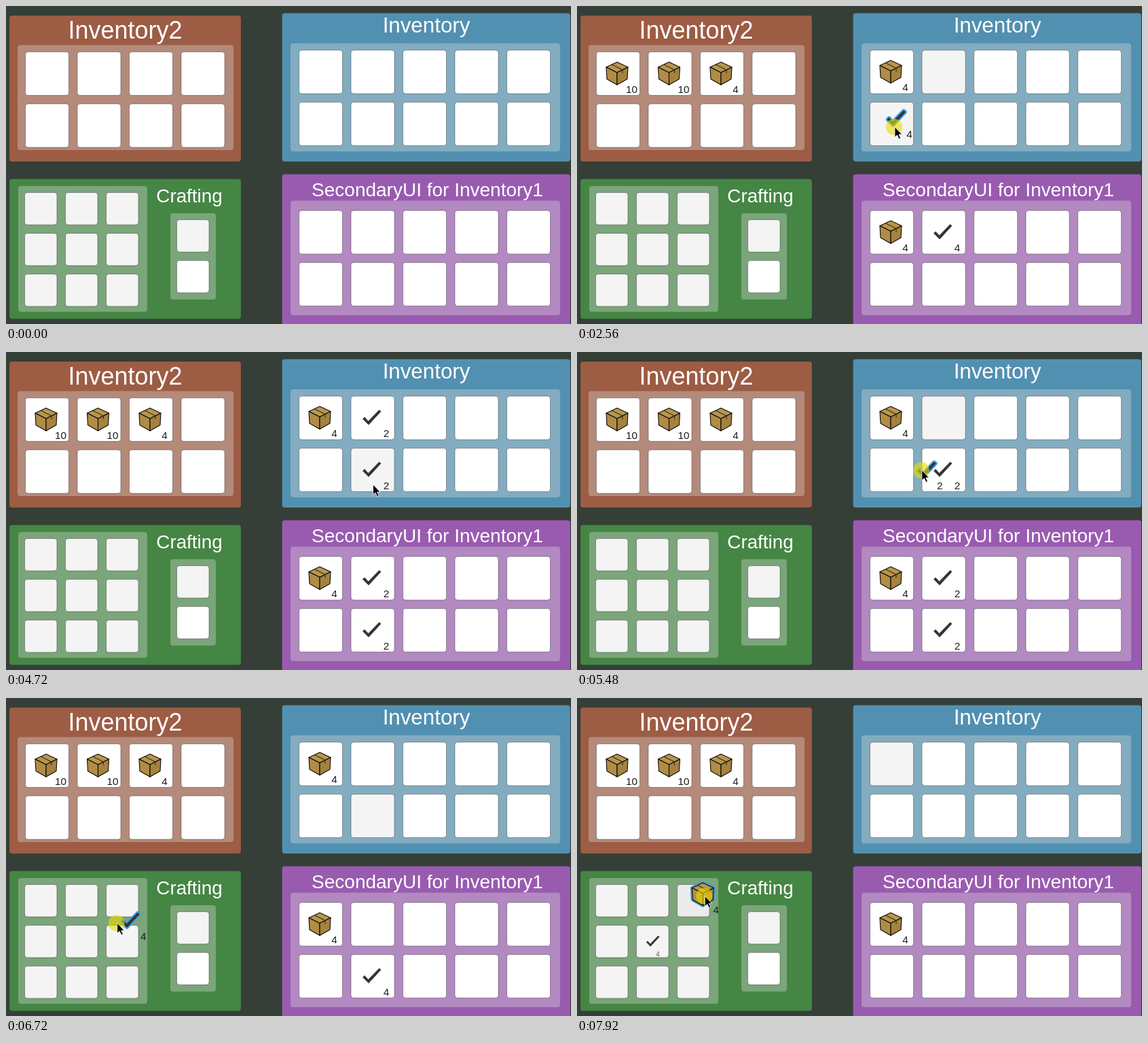
These frames come from a looping animation (832 px wide and 468 px high, 8 s). An HTML page:

```html
<!DOCTYPE html>
<html lang="en">
<head>
<meta charset="utf-8">
<title>Inventory drag and drop</title>
<style>
  html, body { margin: 0; width: 100%; height: 100%; overflow: hidden; background: #353f37; }
  svg { display: block; width: 832px; height: 468px; }
  text { font-family: "Liberation Sans", Arial, sans-serif; text-anchor: middle; }
  .title { fill: #fff; }
  .count { fill: #1c1c1c; font-size: 15.3px; }
  .panel { stroke: rgba(0, 0, 0, .08); }
  .tray { fill: rgba(222, 222, 222, .35); }
  .slot { stroke: rgba(40, 40, 40, .42); }
</style>
</head>
<body>
<svg viewBox="0 0 832 468">
  <defs>
    <g id="box" stroke="#0d0a05" stroke-width="1.1" stroke-linejoin="round">
      <path d="M0-16.5 16-9 0-1-16-9Z" fill="#b8964f"/>
      <path d="M-16-9 0-1V17L-15 8.5Z" fill="#b08c46"/>
      <path d="M16-9 0-1V17L15 8.5Z" fill="#a5823f"/>
      <path d="M-8-13 8-5V0" fill="none" stroke="#3b2d12"/>
    </g>
    <path id="check" d="M-13 2-10.5-.5-5 5.5 11-11 13.5-9-4.5 10.5Z" fill="#333" stroke="#333" stroke-width=".8"/>
    <path id="boxEdge" d="M0-16.5 16-9 15 8.5 0 17-15 8.5-16-9Z"/>
    <path id="checkEdge" d="M-13 2-10.5-.5-5 5.5 11-11 13.5-9-4.5 10.5Z"/>
  </defs>
  <g id="board"></g>
  <g id="held">
    <use id="heldEdge" fill="#3d9fe6" stroke="#3d9fe6" stroke-width="5" stroke-linejoin="round"/>
    <use id="heldItem"/>
    <text id="heldCount" class="count" x="19.5" y="29"></text>
  </g>
  <circle id="press" r="12" fill="#e8dc00" fill-opacity=".62"/>
  <path id="cursor" d="M0 0V15L3.5 12 6.2 17.6 8.6 16.5 6 11H10.6Z" fill="#000" stroke="#fff" stroke-width=".8"/>
</svg>
<script>
const LOOP = 8000, STEP = 80;
const $ = id => document.getElementById(id);
const board = $("board");

function add(tag, attrs, text) {
  const el = document.createElementNS("http://www.w3.org/2000/svg", tag);
  for (const k in attrs) el.setAttribute(k, attrs[k]);
  if (text) el.textContent = text;
  return board.appendChild(el);
}
const rect = (cls, x, y, width, height, fill) =>
  add("rect", { class: cls, x, y, width, height, rx: 4, ...(fill && { fill }) });
const title = (text, x, y, size) => add("text", { class: "title", x, y, "font-size": size }, text);

rect("panel", 5, 14, 341, 215, "#9d5c44");
rect("tray", 17, 57.5, 318, 154.5);
title("Inventory2", 175.5, 48, 36);
rect("panel", 406.5, 10.5, 424.5, 218.5, "#5290b1");
rect("tray", 419, 55, 397, 159);
title("Inventory", 619, 39.3, 31.3);
rect("panel", 5, 254.5, 341, 206, "#458644");
rect("tray", 18, 265, 190, 185);
rect("tray", 242, 305, 67, 127);
title("Crafting", 270, 289, 27.8);
rect("panel", 406.5, 247.5, 424.5, 223, "#995bb0");
rect("tray", 419, 286.5, 397, 168.5);
title("SecondaryUI for Inventory1", 620.5, 280, 28);

// Slots are named by grid letter and index, row by row.
const slots = {};
function grid(key, x0, y0, cols, rows, fill, hoverFill, small) {
  const gap = small ? 60 : 76.5, size = small ? 47.5 : 64;
  for (let i = 0; i < cols * rows; i++) {
    const x = x0 + i % cols * gap, y = y0 + Math.floor(i / cols) * gap;
    const mid = small ? [x + 24, y + 23.5] : [x + 30.5, y + 31.5];
    slots[key + i] = {
      x, y, size, mid, fill, hoverFill,
      bg: rect("slot", x, y, size, size, fill),
      icon: add("use", { transform: `translate(${mid}) scale(${small ? .72 : 1})` }),
      label: add("text", {
        class: "count", x: x + (small ? 31.5 : 52), y: y + (small ? 46 : 60),
        style: small ? "font-size:10px;fill:#666" : ""
      })
    };
  }
}
grid("b", 28.5, 67.5, 4, 2, "#fff", "#f4f4f4");
grid("a", 431.5, 65, 5, 2, "#fff", "#f4f4f4");
grid("s", 431.5, 301, 5, 2, "#fff");
grid("c", 27.5, 274.5, 3, 3, "#f4f4f4", "#ebebeb", true);
grid("o", 251.5, 314.5, 1, 1, "#f4f4f4", "#ebebeb", true);
grid("p", 251.5, 374.5, 1, 1, "#fff", "#f4f4f4", true);

// grip: pointer offset from the middle of the item
const drags = [
  { from: "a1", to: "a5", start: 2320, end: 2720, grip: [-2, 13], item: "check", n: 4 },
  { from: "a5", to: "a1", start: 3200, end: 3680, grip: [-2, 13], item: "check", n: 4 },
  { from: "a1", to: "a6", start: 4120, end: 4480, grip: [2, 22], item: "check", n: 2, left: 2 },
  { from: "a1", via: "a5", to: "a6", start: 5000, end: 5720, grip: [-7, 1], item: "check", n: 2, total: 4 },
  { from: "a6", to: "c4", start: 6320, end: 7040, grip: [-19, 4], item: "check", n: 4 },
  { from: "a0", to: "c2", start: 7640, end: 8070, grip: [3, 3], item: "box", n: 4 }
];

// The pointer rests between glides.
const entry = [735, 490];
const glides = [
  { start: 0, end: 400, to: [609, 366] },
  { start: 1280, end: 1680, to: [536, 149] }
];
for (const { from, via, to, start, end, grip } of drags) {
  const at = key => slots[key].mid.map((v, i) => v + grip[i]);
  const last = glides[glides.length - 1].to, first = at(from);
  const reach = 60 + Math.hypot(first[0] - last[0], first[1] - last[1]);
  glides.push({ start: start - reach, end: start, to: first });
  const stops = via ? [via, to] : [to], span = (end - start) * .75 / stops.length;
  stops.forEach((key, i) =>
    glides.push({ start: start + i * span, end: start + (i + 1) * span, to: at(key) }));
}
const smooth = k => k * k * (3 - 2 * k);
function pointer(t) {
  let pos = entry;
  for (const { start, end, to } of glides) {
    if (t < start) break;
    const k = smooth(Math.min(1, (t - start) / (end - start)));
    pos = pos.map((v, i) => v + (to[i] - v) * k);
  }
  return pos;
}

// Changes of slot contents; a count of 0 empties the slot.
const fills = [];
const put = (time, key, n, item) => fills.push({ time, key, n, item });
for (const key of ["a", "s"]) {
  put(920, key + 0, 4, "box");
  put(1080, key + 1, 4, "check");
}
// Boxes arrive four at a time in stacks of ten.
for (let n = 1; n <= 6; n++)
  for (let i = 0; i < 3; i++) {
    const count = Math.min(10, n * 4 - i * 10);
    if (count > 0) put(1240 + n * 130, "b" + i, count, "box");
  }
// The second view follows only once an item is dropped.
const mirror = key => key.replace("a", "s");
for (const { from, to, start, end, n, item, left = 0, total = n } of drags) {
  put(start, from, left, item);
  put(end, mirror(from), left, item);
  put(end, to, total, item);
  put(end, mirror(to), total, item);
}
fills.sort((p, q) => p.time - q.time);

const inside = (s, [x, y]) => x >= s.x && x <= s.x + s.size && y >= s.y && y <= s.y + s.size;
const move = (el, x, y) => el.setAttribute("transform", `translate(${x} ${y})`);

function draw(t) {
  const content = {};
  for (const f of fills) if (f.time <= t) content[f.key] = f;

  const pos = pointer(t);
  const last = drags.filter(d => d.start <= t).pop();
  const selected = last && !last.left ? last.from : "";

  for (const key in slots) {
    const s = slots[key], c = content[key];
    const lit = s.hoverFill && (key === selected || inside(s, pos));
    s.bg.setAttribute("fill", lit ? s.hoverFill : s.fill);
    s.icon.setAttribute("href", c && c.n ? "#" + c.item : "");
    s.label.textContent = c && c.n ? c.n : "";
  }

  const drag = last && t < last.end ? last : null;
  $("held").style.display = $("press").style.display = drag ? "" : "none";
  if (drag) {
    move($("held"), pos[0] - drag.grip[0], pos[1] - drag.grip[1]);
    $("heldEdge").setAttribute("href", `#${drag.item}Edge`);
    $("heldItem").setAttribute("href", "#" + drag.item);
    $("heldCount").textContent = drag.n;
    move($("press"), pos[0] - 1, pos[1]);
  }
  move($("cursor"), ...pos);
}

const begin = performance.now();
function tick() {
  const t = (performance.now() - begin) % LOOP;
  draw(Math.floor(t / STEP) * STEP);
  requestAnimationFrame(tick);
}
tick();
</script>
</body>
</html>
```
